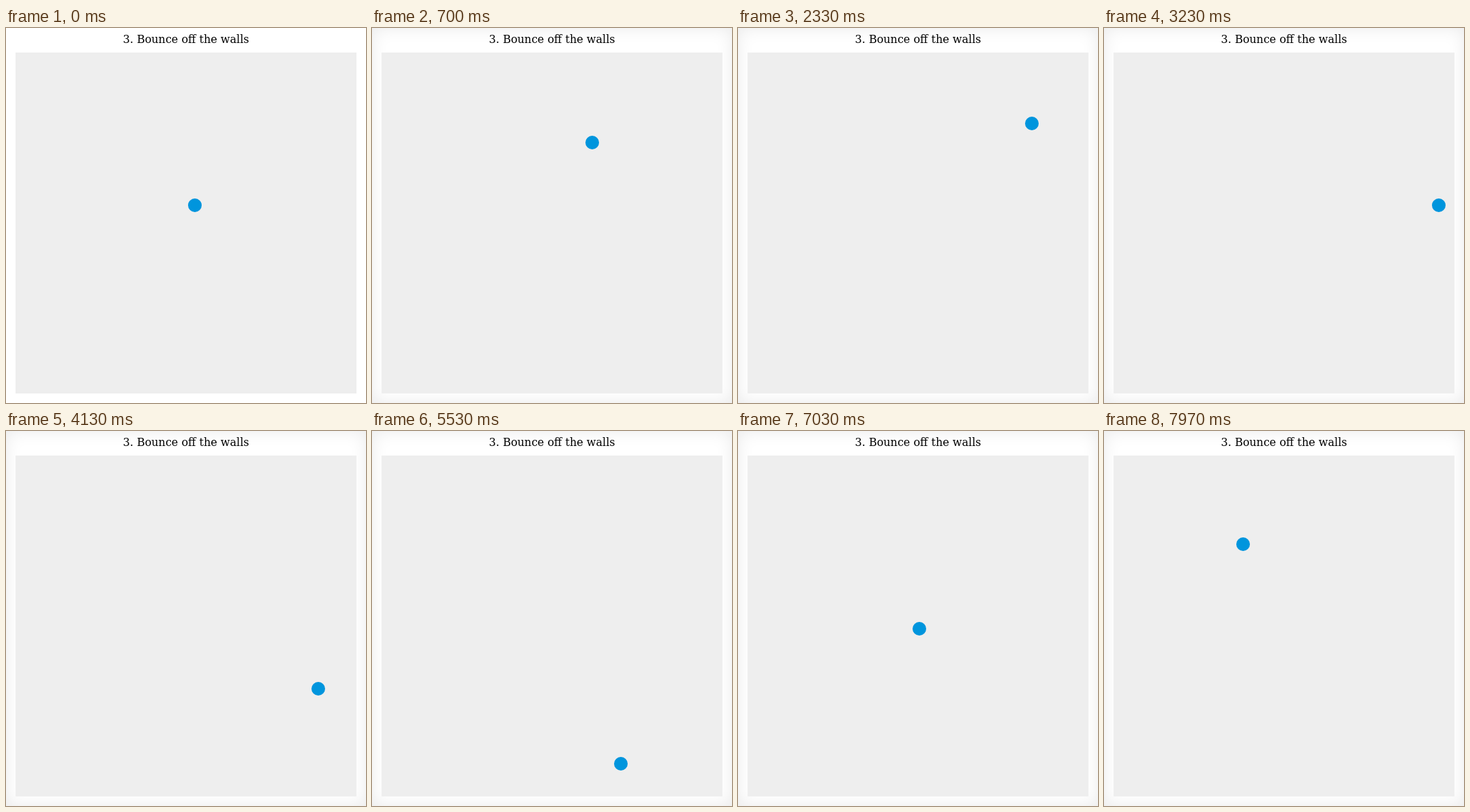
An HTML page that plays this animation: 528 px wide and 550 px high, repeating every 8000 ms.

```html
<!DOCTYPE html>
<html lang="en">
<head>
<meta charset="utf-8">
<title>Bounce off the walls</title>
<style>
  html, body { margin: 0; width: 100%; height: 100%; overflow: hidden; background: #fff; }
  #glow { position: absolute; left: 0; top: 0; width: 528px; height: 550px; box-shadow: inset 0 0 24px #eaeaea; }
  svg { position: absolute; left: 0; top: 0; display: block; }
  text { font: 16px "DejaVu Serif", serif; text-anchor: middle; }
</style>
</head>
<body>
<div id="glow"></div>
<svg width="528" height="550" viewBox="0 0 528 550">
  <text x="264" y="22">3. Bounce off the walls</text>
  <rect x="14" y="36" width="500" height="500" fill="#eee"/>
  <circle id="ball" cx="277" cy="260" r="10" fill="#0095dd"/>
</svg>
<script>
  const LOOP = 8000, TICK = 100 / 3, STEPS_PER_TICK = 2.204;
  const ball = document.getElementById('ball');
  const glow = document.getElementById('glow');

  // Reflect a straight path between two walls
  function bounce(p, lo, hi) {
    const span = hi - lo;
    const d = (((p - lo) % (2 * span)) + 2 * span) % (2 * span);
    return lo + (d > span ? 2 * span - d : d);
  }

  function render(t) {
    const tick = Math.floor((t + 3.4) / TICK);
    const n = Math.round(tick * STEPS_PER_TICK);
    ball.setAttribute('cx', bounce(277 + n, 24, 504));
    ball.setAttribute('cy', bounce(260 - 2 * n, 46, 526));
    glow.style.visibility = tick ? 'visible' : 'hidden';
  }

  const start = performance.now();
  function loop() {
    render((performance.now() - start) % LOOP);
    requestAnimationFrame(loop);
  }
  render(0);
  requestAnimationFrame(loop);
</script>
</body>
</html>
```
